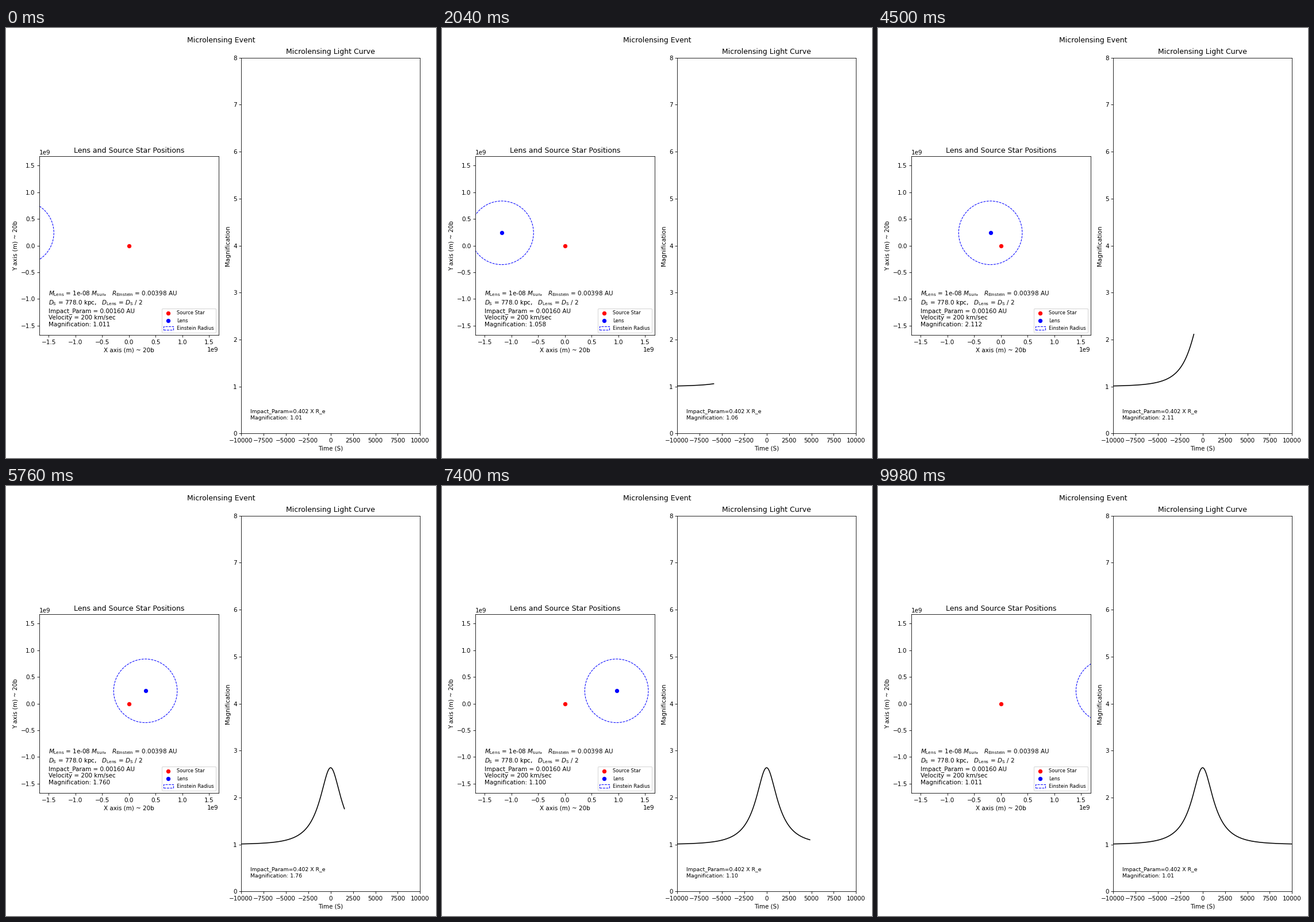
Recreate the animation shown at these times as a matplotlib script. Size 748 px wide and 748 px high, loop 10 s.

```python
import matplotlib.pyplot as plt
import numpy as np
from matplotlib.animation import FuncAnimation

SIZE, DPI = 748, 75
FRAMES, INTERVAL = 500, 20

G, C = 6.674e-11, 3e8
SUN, AU, KPC = 1.989e30, 1.496e11, 3.086e19

mass = 1e-8
dist = 778.0
speed = 200
impact = 0.0016 * AU
einstein = np.sqrt(4 * G * mass * SUN / C**2 * dist * KPC / 4)

time = np.linspace(-10000, 10000, FRAMES)
lens_x = speed * 1e3 * time
u = np.hypot(lens_x, impact) / einstein
gain = (u**2 + 2) / (u * np.sqrt(u**2 + 4))


def info_text(i):
    return "\n".join([
        rf"$M_{{\mathrm{{Lens}}}}$ = {mass:.0e} $M_{{\mathrm{{sun}}}}$,   "
        rf"$R_{{\mathrm{{Einstein}}}}$ = {einstein / AU:.5f} AU",
        rf"$D_{{\mathrm{{S}}}}$ = {dist:.1f} kpc,   "
        r"$D_{\mathrm{Lens}}$ = $D_{\mathrm{S}}$ / 2",
        f"Impact_Param = {impact / AU:.5f} AU",
        f"Velocity = {speed} km/sec",
        f"Magnification: {gain[i]:.3f}",
    ])


def note_text(i):
    return (f"Impact_Param={impact / einstein:.3f} X R_e\n"
            f"Magnification: {gain[i]:.2f}")


plt.rcParams["font.family"] = "DejaVu Sans"
fig, (sky, light) = plt.subplots(1, 2, figsize=(SIZE / DPI, SIZE / DPI), dpi=DPI)
heading = fig.suptitle("Microlensing Event")

# Lens and source view
lim = 7 * impact
sky.set(xlim=(-lim, lim), ylim=(-lim, lim), aspect="equal",
        title="Lens and Source Star Positions",
        xlabel="X axis (m) ~ 20b", ylabel="Y axis (m) ~ 20b")
star, = sky.plot([0], [0], "ro", label="Source Star")
lens, = sky.plot([lens_x[0]], [impact], "bo", label="Lens")
ring = plt.Circle((lens_x[0], impact), einstein, color="blue", fill=False,
                  linestyle="--", label="Einstein Radius")
sky.add_patch(ring)
sky.legend(loc="lower right", fontsize=8)
info = sky.text(0.05, 0.05, info_text(0), fontsize=10, transform=sky.transAxes)

# Light curve view
light.set(xlim=(-10000, 10000), ylim=(0, 8), title="Microlensing Light Curve",
          xlabel="Time (S)", ylabel="Magnification")
curve, = light.plot([], [], "k")
note = light.text(-9000, 0.3, note_text(0), fontsize=9)

fig.tight_layout()

# Draw the fixed parts once and keep them as a backdrop, so frames stay cheap
moving = [star, lens, ring, info, curve, note,
          *sky.spines.values(), *light.spines.values()]
for part in moving:
    part.set_visible(False)
fig.canvas.draw()
backdrop = np.array(fig.canvas.buffer_rgba())
fig.figimage(backdrop, zorder=-1)
heading.set_visible(False)
for ax in (sky, light):
    for part in ax.get_children():
        part.set_visible(part in moving)


def update(i):
    lens.set_data([lens_x[i]], [impact])
    ring.center = lens_x[i], impact
    curve.set_data(time[:i + 1], gain[:i + 1])
    info.set_text(info_text(i))
    note.set_text(note_text(i))
    return moving


anim = FuncAnimation(fig, update, frames=FRAMES, interval=INTERVAL,
                     repeat=True, repeat_delay=0)
plt.show()
```
